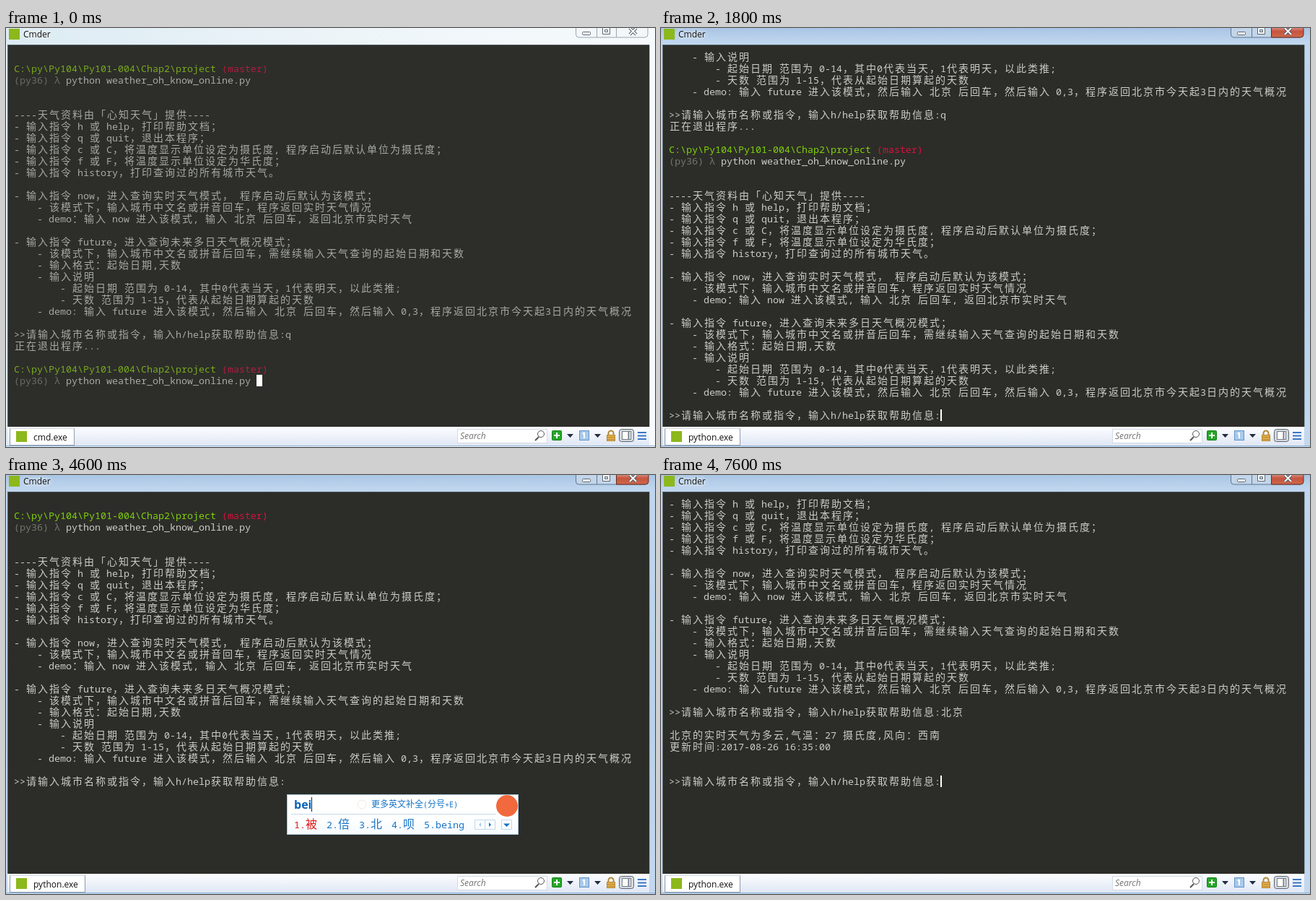
An HTML page for the animation above (8 s loop, 899 px wide and 580 px high).

```html
<!DOCTYPE html>
<html lang="zh-CN">
<head>
<meta charset="utf-8">
<title>Cmder</title>
<style>
html, body { margin: 0; width: 100%; height: 100%; overflow: hidden; }
#win {
  position: relative; width: 899px; height: 580px; overflow: hidden;
  background: linear-gradient(#a9c5e4, #c0d6ee 20px, #b9d1ea 60%, #c3d8ee);
  font: 12px/16px "Open Sans", "Noto Sans", sans-serif; color: #111;
}
#win.idle { background: linear-gradient(90deg, #dcebf3, #eef5f9 55%, #f6fafc); }
#win div, #win svg { position: absolute; }
.logo { width: 15px; height: 15px; background: #8cb81c; }
#title { left: 24px; top: 1px; text-shadow: 0 0 6px #fff, 0 0 9px #fff; }

#term {
  left: 2px; top: 23px; width: 889px; height: 529px; background: #2c2d28;
  --text: #cbccc8; --path: #80cf0c; --branch: #d8103f; --env: #75756d;
}
.idle #term, .dim #term { --text: #a6a8a3; --path: #78a81c; --branch: #b01c40; --env: #6a6b64; }
.dim.idle #term { background: #2d2e2a; }
#clip { left: 9px; top: 9px; width: 880px; height: 512px; overflow: hidden; }
#log {
  left: 0; top: 0; width: 880px; white-space: pre; color: var(--text);
  font: 13.3333px/16px "Noto Sans Mono", monospace; font-variant-ligatures: none;
}
#log div { left: 0; height: 16px; }
.cjk {
  position: relative; left: 1px; letter-spacing: 2px;
  font: 300 14px/0 "Noto Sans CJK SC", "Noto Sans CJK", sans-serif;
}
.path { color: var(--path); }
.branch { color: var(--branch); }
.env { color: var(--env); }
#cursor { width: 2px; height: 16px; background: #fff; }

#bar { left: 2px; top: 552px; width: 889px; height: 26px; background: linear-gradient(#fdfdff, #dfe7f4); }
#tab {
  left: 5px; top: 554px; height: 22px; padding: 0 9px 0 32px; border: 1px solid #8f9bab;
  border-top-color: #d5dce5; background: #fff; line-height: 23px;
}
#tab .logo { left: 8px; top: 3px; }
#search {
  left: 625px; top: 555px; width: 120px; height: 18px; padding-left: 3px; border: 1px solid #d3dbe5;
  background: #fff; font-style: italic; line-height: 18px; color: #747474;
}

#ime {
  left: 389px; top: 442px; width: 319px; height: 54px; border: 1px solid #a9c5dc;
  background: linear-gradient(#fff 60%, #f5faff); color: #1673c6; white-space: pre;
}
#keys { left: 9px; top: 3px; font: bold 16px/20px "Open Sans", sans-serif; color: #0a62b8; border-right: 1px solid #222; }
#hint { left: 116px; top: 5px; font: 10px/16px "Noto Sans Mono", monospace; }
#hint .cjk { left: 0; font-size: 12px; letter-spacing: 0; }
#rule { left: 5px; top: 26px; width: 284px; height: 1px; background: #c5d8e8; }
#picks { left: 9px; top: 32px; display: flex; gap: 13px; font: 13.3333px/18px "Noto Sans Mono", monospace; }
#picks > span:first-child { color: #e01818; }
#picks .cjk { left: 0; font-size: 16px; letter-spacing: 0; }
#badge { left: 289px; top: 0; width: 30px; height: 30px; border-radius: 50%; background: #f2693d; }
</style>
</head>
<body>
<div id="win">
  <div class="logo" style="left:4px;top:1px"></div>
  <div id="title">Cmder</div>
  <svg id="buttons" width="899" height="23" fill="none">
    <defs>
      <linearGradient id="red" x2="0" y2="1">
        <stop stop-color="#dc9a8c"/><stop offset=".45" stop-color="#c5543f"/><stop offset="1" stop-color="#cf6a4c"/>
      </linearGradient>
    </defs>
    <path id="frame" d="M789.5-2V9q0 4 4 4H885q4 0 4-4V-2M818.5 0V13M845.5 0V13"/>
    <path id="close" d="M845.5-2V13H886q4 0 4-4V-2z" fill="url(#red)" stroke="#6b2a20"/>
    <g stroke="#5c6670" fill="#fff">
      <rect x="798.5" y="5.5" width="11" height="4" rx="1"/>
      <path d="M826.5-2V8.500H836.500V-2M829.500 2.500H833.500V5.500H829.500z"/>
    </g>
    <path d="M864 0L873 9M873 0L864 9" stroke="#535d68" stroke-width="4"/>
    <path d="M864 0L873 9M873 0L864 9" stroke="#fff" stroke-width="2"/>
  </svg>

  <div id="term">
    <div id="clip"><div id="log"></div></div>
  </div>

  <div id="bar"></div>
  <div id="tab"><div class="logo"></div><span id="task"></span></div>
  <div id="search">Search</div>
  <svg width="899" height="580" fill="none" style="left:0;top:0">
    <path d="M2.500 552V23.500H891.500V552" stroke="#6f7d8c" stroke-opacity=".6"/>
    <path d="M0 578.500H899" stroke="#8fb0d4"/>
    <circle cx="741" cy="562" r="4.500" stroke="#555"/>
    <path d="M738 566L733 571" stroke="#555" stroke-width="2"/>
    <rect x="756.500" y="557.500" width="13" height="13" rx="1" fill="#25a828" stroke="#14801a"/>
    <path d="M763 560V568M759 564H767" stroke="#fff" stroke-width="2"/>
    <path d="M777 562H786L781.500 567zM815 562H824L819.500 567z" fill="#222c44"/>
    <rect x="794.500" y="557.500" width="13" height="13" fill="#a9caeb" stroke="#5f93cb"/>
    <path d="M801 560V568M799 562L801 560" stroke="#fff" stroke-width="2"/>
    <path d="M834.500 564V561a3.500 3.500 0 0 1 7 0V564" stroke="#b58a3a" stroke-width="2"/>
    <rect x="832.500" y="563.500" width="11" height="8" fill="#e3ad45" stroke="#b58a3a"/>
    <path d="M833 566.500H843M833 569.500H843" stroke="#b58a3a"/>
    <rect x="849.500" y="555.500" width="20" height="17" rx="3" fill="#d5dae0" stroke="#5e6670"/>
    <rect x="853.500" y="558.500" width="12" height="11" fill="#fff" stroke="#777f88"/>
    <path d="M862.500 559V569" stroke="#777f88" stroke-width="2"/>
    <path d="M875 560H887M875 564.500H887M875 569H887" stroke="#3a78c4" stroke-width="2"/>
  </svg>

  <div id="ime">
    <div id="keys"></div>
    <div id="hint"></div>
    <div id="rule"></div>
    <div id="picks"></div>
    <div id="badge"></div>
    <svg width="319" height="54" fill="none" style="left:0;top:0">
      <circle cx="103" cy="13" r="6" stroke="#f3e6e0"/>
      <path d="M259.500 34.500H287.500V47.500H259.500zM273.500 34V48M296.500 34.500H310.500V47.500H296.500z" stroke="#bfd8ec"/>
      <path d="M268 38V44L265 41z" fill="#a9c9e4"/>
      <path d="M279 38V44L282 41zM299 39.500H308L303.500 44z" fill="#1673c6"/>
    </svg>
  </div>
</div>

<script>
const $ = id => document.getElementById(id);
const mark = s => s.replace(/[\u3000-\uffef]+/g, '<span class="cjk">$&</span>');
const tint = (name, s) => `<span class="${name}">${s}</span>`;

const prompt = '>>请输入城市名称或指令，输入h/help获取帮助信息:';
const shell = [
  tint('path', 'C:\\py\\Py104\\Py101-004\\Chap2\\project') + ' ' + tint('branch', '(master)'),
  tint('env', '(py36) λ') + ' python weather_oh_know_online.py'
];
const help = `

----天气资料由「心知天气」提供----
- 输入指令 h 或 help，打印帮助文档；
- 输入指令 q 或 quit，退出本程序；
- 输入指令 c 或 C，将温度显示单位设定为摄氏度, 程序启动后默认单位为摄氏度；
- 输入指令 f 或 F，将温度显示单位设定为华氏度；
- 输入指令 history，打印查询过的所有城市天气。

- 输入指令 now，进入查询实时天气模式， 程序启动后默认为该模式；
    - 该模式下，输入城市中文名或拼音回车，程序返回实时天气情况
    - demo：输入 now 进入该模式, 输入 北京 后回车, 返回北京市实时天气

- 输入指令 future，进入查询未来多日天气概况模式；
    - 该模式下，输入城市中文名或拼音后回车，需继续输入天气查询的起始日期和天数
    - 输入格式：起始日期,天数
    - 输入说明
        - 起始日期 范围为 0-14，其中0代表当天，1代表明天，以此类推;
        - 天数 范围为 1-15，代表从起始日期算起的天数
    - demo: 输入 future 进入该模式，然后输入 北京 后回车，然后输入 0,3，程序返回北京市今天起3日内的天气概况
`.split('\n');

const rows = [
  '', ...shell, ...help, prompt + 'q', '正在退出程序...', '',
  ...shell, ...help, prompt, '',
  '北京的实时天气为多云,气温：27 摄氏度,风向：西南', '更新时间:2017-08-26 16:35:00', '', '',
  prompt
];
const askRow = 50, lastRow = 56;

const lines = rows.map((text, i) => {
  const line = document.createElement('div');
  line.style.top = i * 16 + 'px';
  line.innerHTML = mark(text);
  $('log').append(line);
  return line;
});
const cursor = document.createElement('div');
cursor.id = 'cursor';
$('log').append(cursor);
$('hint').innerHTML = mark('更多英文补全(分号+E)');

const city = ['北京', '背景', '背静', '北'];
const picks = {
  b: ['不', '吧', '把', '被', '比'],
  be: ['被', '呗', '贝', '北', 'be'],
  bei: ['被', '倍', '北', '呗', 'being']
};

// Each step changes part of the state; cursor is [row, column].
const ask = [askRow, 47], again = [lastRow, 47];
const steps = [
  [0, { dim: true, idle: true, count: 29, top: 0, cursor: [28, 42], block: true, task: 'cmd.exe', keys: '', typed: '' }],
  [200, { dim: false, block: false }],
  [300, { idle: false }],
  [800, { cursor: null }],
  [900, { cursor: [29, 0] }],
  [1300, { task: 'python.exe' }],
  [1400, { cursor: null }],
  [1800, { count: 51, top: 19, cursor: ask }],
  [1900, { top: 26 }],
  [2400, { cursor: null }],
  [2900, { cursor: ask }],
  [3400, { cursor: null }],
  [3900, { cursor: ask }],
  [4100, { keys: 'b' }],
  [4200, { keys: 'be' }],
  [4400, { cursor: null }],
  [4600, { keys: 'bei' }],
  [4700, { keys: 'beij' }],
  [4800, { keys: 'beijin' }],
  [4900, { keys: 'beijing', cursor: ask }],
  [5000, { keys: '', typed: '北', cursor: [askRow, 49] }],
  [5500, { cursor: null }],
  [5600, { typed: '北京', cursor: [askRow, 51] }],
  [6100, { cursor: [51, 0] }],
  [6500, { count: 56, cursor: [lastRow, 0] }],
  [6600, { count: 57, top: 32, cursor: again }],
  [7100, { cursor: null }],
  [7600, { cursor: again }]
];

function draw(s) {
  $('win').className = (s.dim ? 'dim ' : '') + (s.idle ? 'idle' : '');
  $('close').style.display = s.idle ? 'none' : '';
  $('frame').setAttribute('stroke', s.idle ? '#9aa6b1' : '#5f7690');
  $('frame').setAttribute('fill', s.idle ? '#f3f7fa' : '#c3d5e8');
  $('task').textContent = s.task;
  $('log').style.top = -16 * s.top + 'px';
  lines.forEach((line, i) => { line.style.display = i < s.count ? '' : 'none'; });
  lines[askRow].innerHTML = mark(prompt + s.typed);
  cursor.style.display = s.cursor ? '' : 'none';
  if (s.cursor) {
    cursor.style.top = s.cursor[0] * 16 + 'px';
    cursor.style.left = s.cursor[1] * 8 + 'px';
    cursor.style.width = s.block ? '8px' : '2px';
  }
  $('ime').style.display = s.keys ? '' : 'none';
  $('keys').textContent = s.keys;
  $('picks').innerHTML = (picks[s.keys] || city)
    .map((word, i) => `<span>${i + 1}.${mark(word)}</span>`).join('');
}

const start = performance.now();
let shown = 0;
function tick() {
  const t = (performance.now() - start) % 8000;
  const past = steps.filter(([at]) => at <= t);
  if (past.length !== shown) {
    shown = past.length;
    draw(Object.assign({}, ...past.map(([, change]) => change)));
  }
  requestAnimationFrame(tick);
}
tick();
</script>
</body>
</html>
```
